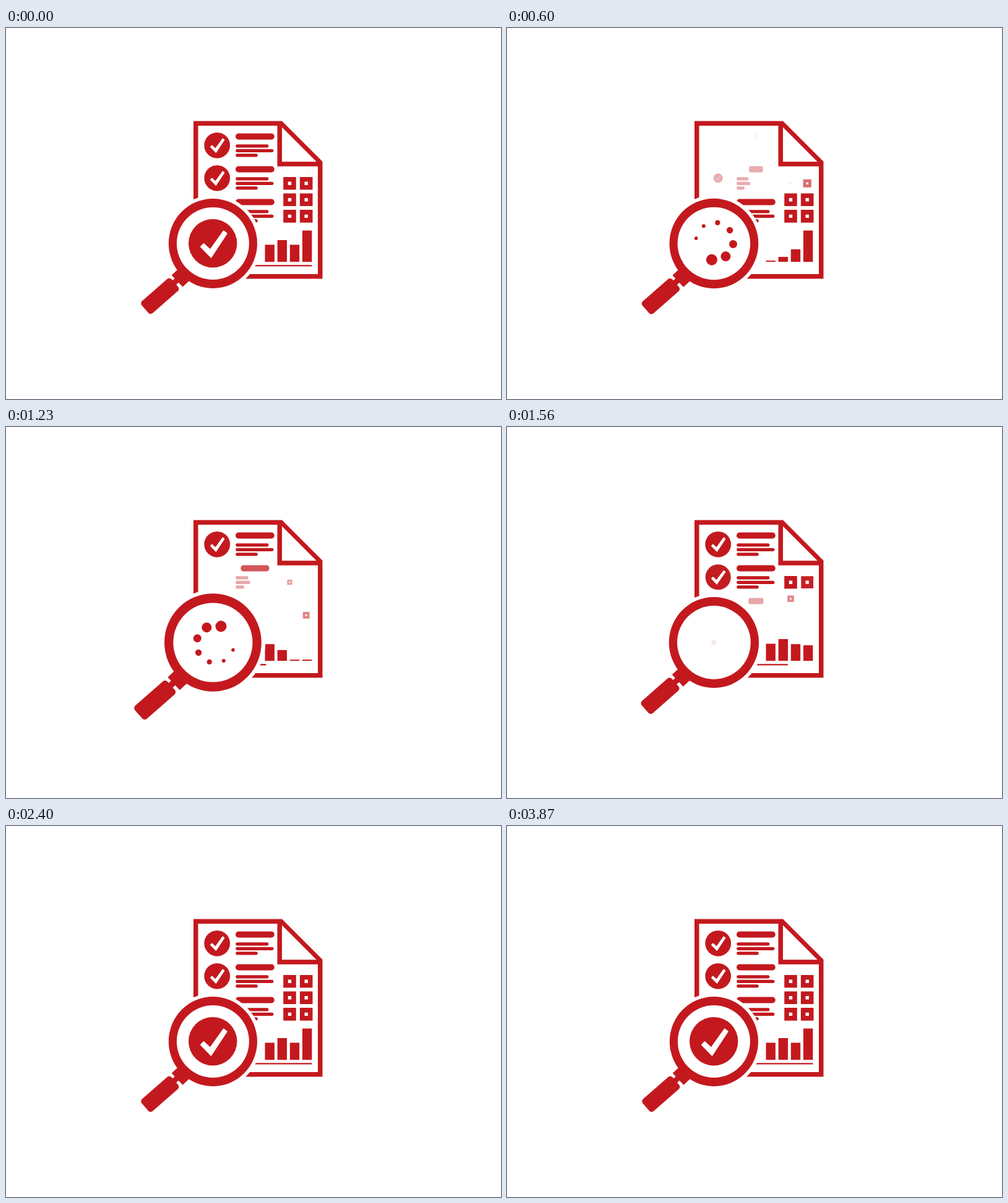
Recreate the animation shown at these times as an HTML page with a canvas. Size 800 px wide and 600 px high, loop 3.9 s.

```html
<!DOCTYPE html>
<html lang="en">
<head>
<meta charset="utf-8">
<title>Report check</title>
<style>
  html, body { margin: 0; width: 100%; height: 100%; overflow: hidden; background: #fff; }
  canvas { display: block; width: 800px; height: 600px; }
</style>
</head>
<body>
<canvas id="stage" width="800" height="600"></canvas>
<script>
const ctx = document.getElementById('stage').getContext('2d');
const RED = '#c3191e';
const LOOP = 3900, STEP = 30, DUR = 400;
const LENS = { x: 334.4, y: 348.5 };
const RAD = Math.PI / 180;

const ease = (t, start, dur = DUR) => {
  const p = Math.min(1, Math.max(0, (t - start) / dur));
  return p * p * (3 - 2 * p);
};

// 1 while shown, 0 between leaving and coming back
const shown = (t, out, back, outDur = DUR, backDur = DUR) =>
  Math.max(1 - ease(t, out, outDur), ease(t, back, backDur));

// Draw inside a local frame; skipped when invisible
function at(x, y, sx, sy, angle, alpha, draw) {
  if (alpha <= 0.004 || sx <= 0 || sy <= 0) return;
  ctx.save();
  ctx.translate(x, y);
  ctx.rotate(angle * RAD);
  ctx.scale(sx, sy);
  ctx.globalAlpha *= alpha;
  draw();
  ctx.restore();
}

function ellipse(x, y, rx, ry = rx, color = RED) {
  ctx.fillStyle = color;
  ctx.beginPath();
  ctx.ellipse(x, y, rx, ry, 0, 0, 2 * Math.PI);
  ctx.fill();
}

function bar(x, y, w, h, r = 0) {
  ctx.fillStyle = RED;
  ctx.beginPath();
  ctx.roundRect(x, y, w, h, r);
  ctx.fill();
}

function trace(points) {
  points.forEach(([x, y], i) => i ? ctx.lineTo(x, y) : ctx.moveTo(x, y));
  ctx.closePath();
}

function tick() {
  ctx.fillStyle = ctx.strokeStyle = '#fff';
  ctx.lineWidth = 2;
  ctx.lineJoin = 'round';
  ctx.beginPath();
  trace([[-20, 5], [-15.5, 0.2], [-4.8, 10], [16.8, -20.3], [21.7, -16.5], [-3.5, 21.8]]);
  ctx.fill();
  ctx.stroke();
}

function drawPage() {
  ctx.fillStyle = RED;
  ctx.beginPath();
  trace([[303, 150.5], [446, 150.5], [511.5, 216], [511.5, 405.5], [303, 405.5]]);
  trace([[310.5, 158], [438.5, 158], [438.5, 223.7], [504, 223.7], [504, 398], [310.5, 398]]);
  trace([[446, 160.5], [446, 216.2], [501.7, 216.2]]);
  ctx.fill('evenodd');
}

// Times: leave, then title, lines and badge coming back
const ROWS = [
  [55, 542, 599, 680],
  [362, 966, 1062, 1190],
  [667, 1390, 1500, 1610]
];

function drawRow(t, i) {
  const [out, titleIn, linesIn, badgeIn] = ROWS[i];
  const y = 189.8 + i * 53;

  const badge = shown(t, out, badgeIn);
  const turn = t > badgeIn ? 90 * (1 - badge) : 0;
  at(341.2, y, badge, badge, turn, badge, () => {
    ellipse(0, 0, 20.9);
    ctx.scale(0.536, 0.536);
    tick();
  });

  const title = shown(t, out, titleIn);
  at(402.4, y - 14.3, title, 1, 0, title, () => bar(-31.4, -4.9, 62.8, 9.8, 4.9));

  const lines = shown(t, out, linesIn);
  at(371.2, y, lines, 1, 0, lines, () => {
    [53.2, 61.2, 35.6].forEach((w, k) => bar(0, -1.6 + k * 7.5, w, 5.2, 2.6));
  });
}

function drawCell(t, i) {
  const v = shown(t, 287 + i * 150, 1056 + i * 150);
  const x = 458.5 + (i % 2) * 26.7;
  const y = 251.2 + Math.floor(i / 2) * 26.6;
  at(x, y, v, v, 0, v, () => {
    ctx.fillStyle = RED;
    ctx.beginPath();
    ctx.rect(-10.3, -10.3, 20.6, 20.6);
    ctx.rect(-2.7, -2.7, 5.4, 5.4);
    ctx.fill('evenodd');
  });
}

function drawChart(t) {
  [27.7, 35.2, 27.7, 50.7].forEach((h, i) => {
    const v = shown(t, 184 + i * 140, 866 + i * 165);
    const tall = Math.max(2, h * v);
    bar(418.5 + i * 20.15, 378.2 - tall, 15.4, tall);
  });
  const base = shown(t, 0, 830, 260, 1333);
  if (base > 0) bar(400, 383.2, 94.4 * base, 2.4);
}

function drawGlass(t) {
  const s = 1 + 0.1 * (ease(t, 540, 480) - ease(t, 1160, 530));
  at(LENS.x, LENS.y, s, s, 0, 1, () => {
    ellipse(0, 0, 77.5, 77.8, '#fff');
    at(-85.6, 85, 1, 1, -41.3, 1, () => bar(-32, -13, 64, 26, 5));
    at(-61, 62, 1, 1, -42, 1, () => bar(-9, -4.5, 18, 9));
    at(-51.6, 55, 1, 1, -43, 1, () => bar(-8.5, -13, 19, 26));
    ellipse(0, 0, 71.6, 72.4);
    ellipse(0, 0, 58.5, 58.5, '#fff');
  });
}

function drawSpinner(t) {
  const alpha = ease(t, 150, 120) - ease(t, 1350, 180);
  const angle = -81 + 0.3 * t;
  // The ring of dots sits slightly off its turning point
  at(337.1, 347.9, 1, 1, angle, alpha, () => {
    ctx.translate(3.4 * Math.cos(145 * RAD), 3.4 * Math.sin(145 * RAD));
    [9, 8, 6.5, 5.2, 4.1, 3, 2.8].forEach((r, i) => {
      const a = -45 * i * RAD;
      ellipse(30.3 * Math.cos(a), 30.3 * Math.sin(a), r);
    });
  });
}

function drawVerdict(t) {
  const disc = shown(t, 0, 1480, 250);
  at(334.2, 348.3, disc, disc, 0, disc, () => ellipse(0, 0, 39.2));
  const mark = shown(t, 0, 1650, 250);
  const turn = t > 1650 ? -90 * (1 - mark) : 0;
  at(334.9, 348.9, mark, mark, turn, mark, tick);
}

function draw(t) {
  ctx.fillStyle = '#fff';
  ctx.fillRect(0, 0, 800, 600);
  drawPage();
  ROWS.forEach((_, i) => drawRow(t, i));
  for (let i = 0; i < 6; i++) drawCell(t, i);
  drawChart(t);
  drawGlass(t);
  drawSpinner(t);
  drawVerdict(t);
}

function frame() {
  const t = performance.now() % LOOP;
  draw(Math.floor(t / STEP) * STEP);
  requestAnimationFrame(frame);
}
frame();
</script>
</body>
</html>
```
